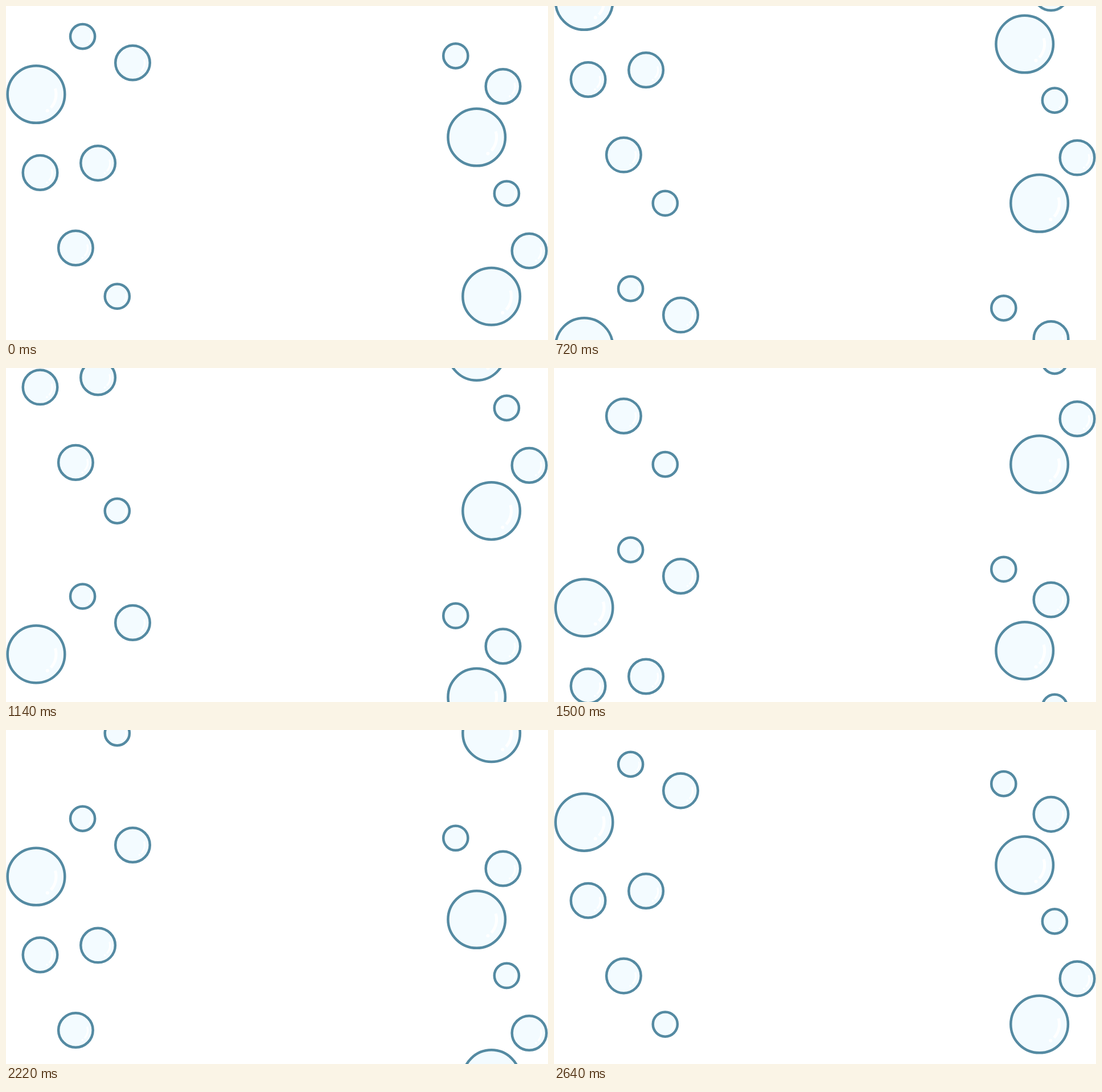
An HTML page with a canvas that plays this animation: 952x588 px, repeating every 2.67 s.

```html
<!DOCTYPE html>
<html lang="en">
<head>
<meta charset="utf-8">
<title>Rising bubbles</title>
<style>
  html, body { margin: 0; width: 100%; height: 100%; overflow: hidden; background: #fff; }
  canvas { display: block; }
</style>
</head>
<body>
<canvas width="952" height="588"></canvas>
<script>
const ctx = document.querySelector('canvas').getContext('2d');
const LOOP = 2670, STEP = 30, TRAVEL = 608;
const SMALL = 21.6, MEDIUM = 30.3, BIG = 50.3;

// x, y, radius at the start of the loop
const bubbles = [
  [134.6, 53.6, SMALL], [222.5, 100, MEDIUM], [53, 155.5, BIG],
  [60, 293.4, MEDIUM], [161.6, 276.6, MEDIUM], [122.4, 426, MEDIUM],
  [195.3, 511.2, SMALL], [789.8, 87.8, SMALL], [873, 141.5, MEDIUM],
  [826.7, 231, BIG], [879.4, 330, SMALL], [919, 431, MEDIUM],
  [852.6, 511.2, BIG]
];

function drawBubble(x, y, r) {
  ctx.beginPath();
  ctx.arc(x, y, r, 0, 2 * Math.PI);
  ctx.fillStyle = '#f3fbff';
  ctx.fill();
  ctx.strokeStyle = '#548aa2';
  ctx.lineWidth = 4.5;
  ctx.stroke();

  // Highlight: a curved streak and a dot below it
  const shine = r * 0.695, dotAngle = 0.97;
  ctx.beginPath();
  ctx.arc(x, y, shine, -0.3, 0.74);
  ctx.strokeStyle = ctx.fillStyle = '#fff';
  ctx.lineWidth = r * 0.1;
  ctx.stroke();
  ctx.beginPath();
  ctx.arc(x + shine * Math.cos(dotAngle), y + shine * Math.sin(dotAngle), r * 0.06, 0, 2 * Math.PI);
  ctx.fill();
}

function render(now) {
  const time = Math.floor((now + 0.5) / STEP) * STEP % LOOP;
  const rise = TRAVEL * time / LOOP;
  ctx.clearRect(0, 0, 952, 588);
  for (const [x, y, r] of bubbles) {
    drawBubble(x, y - rise, r);
    drawBubble(x, y - rise + TRAVEL, r);
  }
  requestAnimationFrame(render);
}
requestAnimationFrame(render);
</script>
</body>
</html>
```
